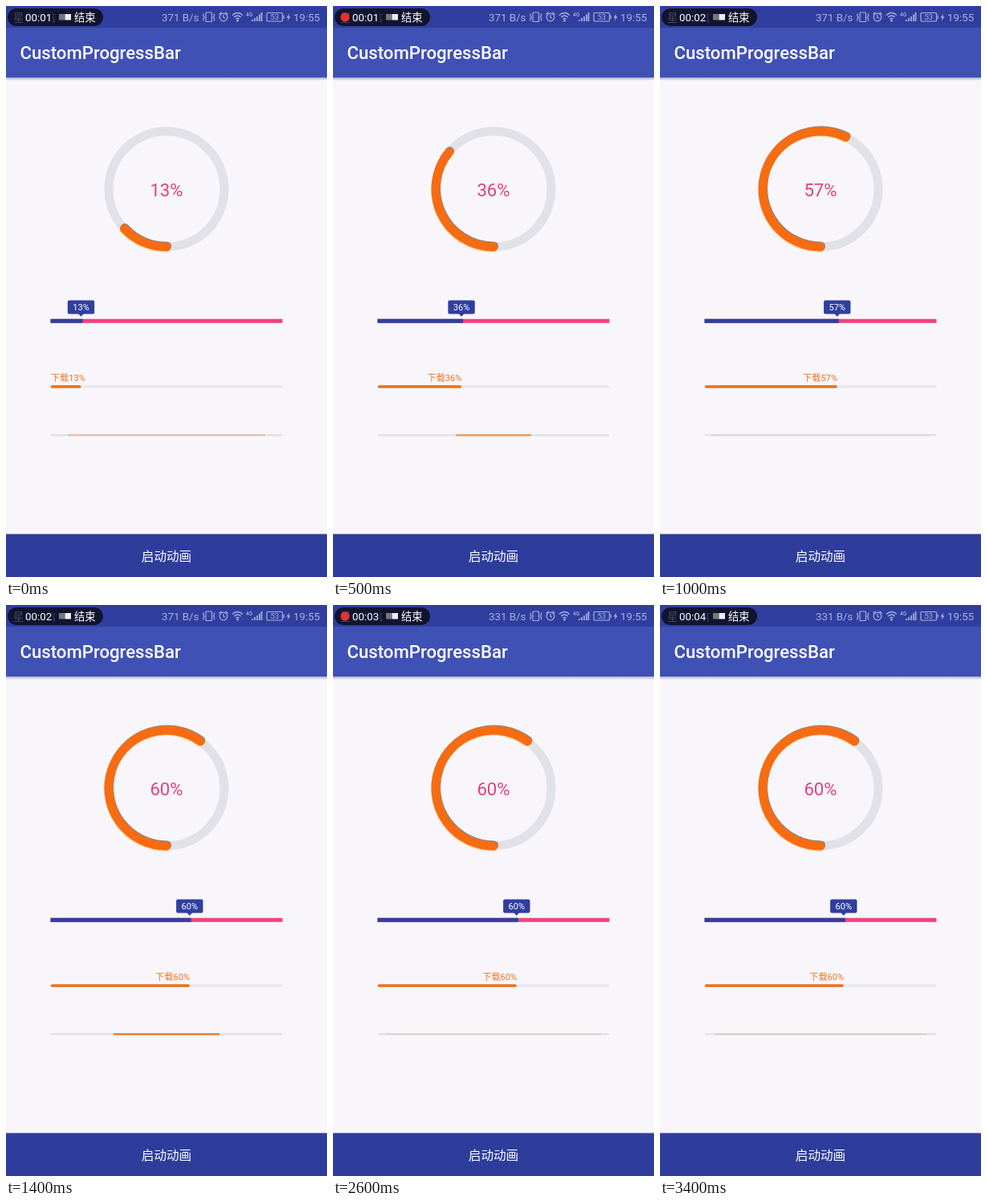
An HTML page that plays this animation: 400 by 711 pixels, repeating every 3500 ms.

```html
<!DOCTYPE html>
<html lang="zh">
<head>
<meta charset="utf-8">
<title>CustomProgressBar</title>
<style>
html, body { margin: 0; width: 100%; height: 100%; overflow: hidden; background: #f8f6fa; }
svg { display: block; width: 100vw; height: 100vh; font-family: Roboto, "Noto Sans CJK SC", "Noto Sans CJK", sans-serif; }
.status { font-size: 13.3px; fill: #a9b1dc; }
.icon { fill: none; stroke: #a9b1dc; stroke-width: 1.2; }
.arc { fill: none; stroke-width: 11; stroke-linecap: round; }
.small { font-size: 11.1px; }
.mid { text-anchor: middle; }
</style>
</head>
<body>
<svg viewBox="0 0 400 711">
  <defs>
    <linearGradient id="shade" x2="0" y2="1">
      <stop stop-color="#a9aed0"/>
      <stop offset="1" stop-color="#f8f6fa"/>
    </linearGradient>
  </defs>
  <rect width="400" height="711" fill="#f8f6fa"/>
  <rect y="89" width="400" height="4" fill="url(#shade)"/>
  <rect y="27" width="400" height="62" fill="#3f51b5"/>
  <rect width="400" height="27" fill="#303f9f"/>
  <text x="17.5" y="66.3" font-size="22.2" font-weight="500" fill="#fff">CustomProgressBar</text>

  <!-- recorder pill -->
  <rect x="2" y="3" width="119" height="22" rx="11" fill="#11142f"/>
  <text x="9" y="18.5" font-size="13.3" fill="#45475c">星海通信</text>
  <rect x="23" y="7" width="35" height="14" fill="#11142f" opacity=".85"/>
  <circle id="dot" cx="15" cy="14" r="5.6" fill="#e5322d"/>
  <text id="clock" x="24" y="18.5" font-size="13.3" fill="#fff"></text>
  <rect x="66" y="10" width="7.5" height="7.5" fill="#77777c"/>
  <rect x="73.5" y="10" width="7.5" height="7.5" fill="#eee"/>
  <text x="85" y="18.7" font-size="13.3" fill="#fff">结束</text>

  <!-- status icons -->
  <text id="speed" class="status" x="194" y="18.5"></text>
  <g class="icon">
    <rect x="249" y="8" width="7.5" height="11.5" rx="1"/>
    <path d="M246 9.5v3l1.200 1.500l-1.200 1.500v3M259.500 9.500v3l-1.200 1.500l1.200 1.500v3"/>
    <circle cx="271" cy="14" r="4.800"/>
    <path d="M271 11v3.300l2 1M265.500 10.500l3-2.700M276.500 10.500l-3-2.700"/>
    <path d="M282 11.500q6.500-6 13 0M284.300 14q4.200-3.800 8.400 0M286.500 16.300q2-1.600 4 0" stroke-width="1.400"/>
    <path d="M307 19v-2M310 19v-4M313 19v-6M316 19v-8.500M318.500 19v-11" stroke-width="1.700"/>
    <rect x="325" y="8.500" width="19.500" height="10.500" rx="1"/>
    <path d="M346.200 11.500v4.500"/>
  </g>
  <circle cx="288.500" cy="18.300" r="1.300" fill="#a9b1dc"/>
  <path d="M353 9.500l-3.500 5h2.200l-.7 4l3.500-5.200h-2.200z" fill="#a9b1dc"/>
  <text x="299" y="13" font-size="6.500" font-weight="500" fill="#a9b1dc">4G</text>
  <text class="mid" x="334.800" y="17.300" font-size="9.500" fill="#a9b1dc">53</text>
  <text class="status" x="358" y="18.500">19:55</text>

  <!-- ring -->
  <circle cx="200" cy="228" r="72" fill="none" stroke="#e0e2e7" stroke-width="11"/>
  <path class="arc" stroke="#8b8789" transform="translate(.6 -1)"/>
  <path class="arc" stroke="#ffdcae" transform="translate(-.5 1.300)"/>
  <path class="arc" stroke="#f66c13"/>
  <text id="percent" class="mid" x="200" y="236.500" font-size="22.200" fill="#e5407c"></text>

  <!-- bar with bubble -->
  <rect x="55.500" y="389.700" width="289" height="5" fill="#f0417f"/>
  <rect id="blue" x="55.500" y="389.700" height="5" fill="#303f9f"/>
  <g id="bubble">
    <path d="M-4 382.500h8l-4 4.300z" fill="#303f9f"/>
    <rect x="-16.700" y="366.500" width="33.400" height="17" rx="2" fill="#303f9f"/>
    <text class="small mid" y="379.300" fill="#fff"></text>
  </g>

  <!-- download bar -->
  <text id="label" class="small" y="466.700" fill="#f07424"></text>
  <path d="M57 473.900H343" stroke="#e8e8ec" stroke-width="3.500" stroke-linecap="round"/>
  <path id="load" stroke="#f07015" stroke-width="3.500" stroke-linecap="round"/>

  <!-- pulsing line -->
  <path d="M56 534.300H344" stroke="#e2e2e8" stroke-width="2.400"/>
  <path id="pulse" stroke="#f07015" stroke-width="2.200"/>

  <rect y="657.500" width="400" height="53.500" fill="#2e3c9c"/>
  <text class="mid" x="200" y="690.700" font-size="15.600" font-weight="500" fill="#fff">启动动画</text>
</svg>
<script>
const $ = id => document.getElementById(id);
const arcs = document.querySelectorAll('.arc');
const bubbleText = document.querySelector('#bubble text');

// [time, value] points joined by straight lines
const progressKeys = [[0, .3085], [200, .381], [700, .6885], [1240, 1]];
const pulseKeys = [[0, .854], [200, .97], [700, 1.5625], [1400, 2.458], [2100, 3.3125], [2600, 3.93], [3400, 4.917]];

function along(keys, t) {
  const i = keys.findIndex(k => k[0] > t);
  if (i < 0) return keys[keys.length - 1][1];
  const [t0, a] = keys[i - 1], [t1, b] = keys[i];
  return a + (b - a) * (t - t0) / (t1 - t0);
}

function draw(t) {
  const p = 30 - 30 * Math.cos(Math.PI * along(progressKeys, t));
  const text = Math.floor(p + .05) + '%';
  const end = 56 + 2.88 * p;

  $('clock').textContent = '00:0' + (1 + Math.floor(t / 1000));
  $('dot').style.display = t % 1000 < 500 ? 'none' : '';
  $('speed').textContent = (t < 2500 ? 371 : 331) + ' B/s';

  const angle = p / 50 * Math.PI;
  const x = 200 - 72 * Math.sin(angle), y = 228 + 72 * Math.cos(angle);
  for (const arc of arcs) arc.setAttribute('d', `M200 300A72 72 0 ${+(p > 50)} 1 ${x} ${y}`);
  $('percent').textContent = text;

  $('blue').setAttribute('width', end - 53.5);
  $('bubble').setAttribute('transform', `translate(${end} 0)`);
  bubbleText.textContent = text;

  $('label').textContent = '下载' + text;
  $('label').setAttribute('x', Math.max(56, end - 42.5));
  $('load').setAttribute('d', `M57.5 473.9H${end - 1.7}`);

  // the line widens from the centre, fading in and out
  const phase = along(pulseKeys, t) % 1;
  $('pulse').setAttribute('d', `M${200 - 144 * phase} 534.3H${200 + 144 * phase}`);
  $('pulse').setAttribute('opacity', Math.min(1, 2.1 * Math.min(phase, 1 - phase)));
}

const start = performance.now();
function tick() {
  draw(Math.floor((performance.now() - start) % 3500 / 100) * 100);
  requestAnimationFrame(tick);
}
tick();
</script>
</body>
</html>
```
